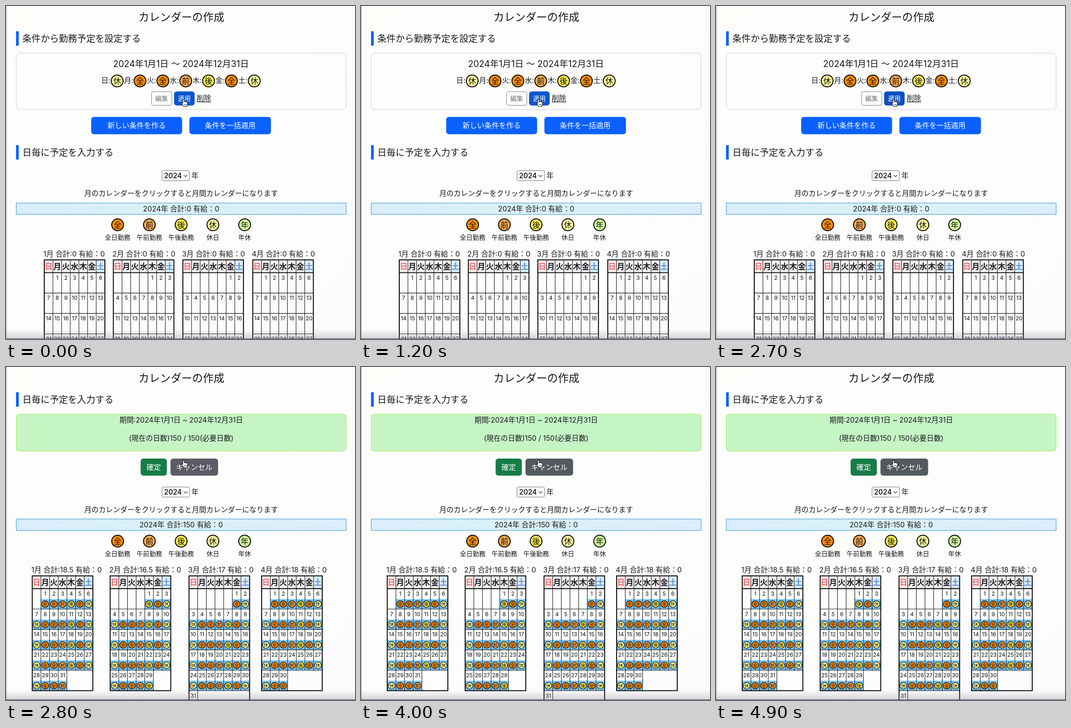
An HTML page for the animation above (5 s loop, 766 by 731 pixels).

```html
<!DOCTYPE html>
<html lang="ja">
<head>
<meta charset="utf-8">
<title>カレンダーの作成</title>
<style>
html, body { margin: 0; width: 100%; height: 100%; overflow: hidden; background: #fdfdfd; }
svg { display: block; width: 766px; height: 731px; }
text { font-family: Inter, "Noto Sans CJK JP", "Noto Sans CJK", sans-serif; fill: #17191c; white-space: pre; }
</style>
</head>
<body>
<svg id="stage" viewBox="0 0 766 731" xmlns="http://www.w3.org/2000/svg"></svg>
<script>
const LOOP = 5000, APPLY_AT = 2800;
const WEEK = [...'日月火水木金土'];
const PLAN = [...'休全全前後全休'];
const COLOR = { 全: '#ff8c00', 前: '#fba94a', 後: '#fdec52', 休: '#ffff9c', 年: '#d0fb9e' };
const LEGEND = [['全', '全日勤務'], ['前', '午前勤務'], ['後', '午後勤務'], ['休', '休日'], ['年', '年休']];
// first weekday, number of days, working days
const MONTHS = [[1, 31, 18.5], [4, 29, 16.5], [5, 31, 17], [1, 30, 18]];
const COL = 19, ROW = 44.8;

const text = (x, y, size, str, more = '') =>
  `<text x="${x}" y="${y}" font-size="${size}" ${more}>${str}</text>`;
const mid = (x, y, size, str, more = '') => text(x, y, size, str, 'text-anchor="middle" ' + more);
const rect = (x, y, w, h, fill, more = '') =>
  `<rect x="${x}" y="${y}" width="${w}" height="${h}" fill="${fill}" ${more}/>`;
const path = (d, more) => `<path d="${d}" ${more}/>`;

function badge(x, y, kind, r, size, line) {
  return `<circle cx="${x}" cy="${y}" r="${r}" fill="${COLOR[kind]}" stroke="#000" stroke-width="${line}"/>` +
    mid(x, y + size * 0.37, size, kind, 'font-weight="500" style="fill:#111"');
}

function heading(y, str) {
  return rect(22, y - 0.5, 6, 31.5, '#0d62fb') + text(36, y + 22.5, 20, str);
}

function button(x, y, w, h, fill, str, size, more = '') {
  return rect(x, y, w, h, fill, 'rx="6" ' + more) +
    mid(x + w / 2, y + h / 2 + size * 0.37, size, str, 'style="fill:#fff"');
}

function monthTable(x, y, [start, days], filled) {
  const rows = Math.ceil((start + days) / 7), width = COL * 7;
  const top = y + 28, bottom = top + ROW * rows;
  const lastCols = (start + days - 1) % 7 + 1;
  let out = '', lines = '';
  WEEK.forEach((d, i) => {
    const fill = i === 0 ? '#fdecec' : i === 6 ? '#d9edfc' : '#f3f1f3';
    const ink = i === 0 ? '#f06a70' : i === 6 ? '#5b8fdc' : '#1c1c20';
    out += rect(x + i * COL, y, COL, 28, fill) +
      mid(x + (i + 0.5) * COL, y + 20.3, 17, d, `font-weight="700" style="fill:${ink}"`);
  });
  for (let n = 1; n <= days; n++) {
    const cell = start + n - 1, c = cell % 7;
    const cx = x + (c + 0.5) * COL, cy = top + Math.floor(cell / 7) * ROW;
    if (filled) {
      out += rect(cx - COL / 2, cy + 23, COL, ROW - 23, '#7cc5f9') + badge(cx, cy + 34, PLAN[c], 7.4, 10.5, 1.2);
    }
    out += mid(cx, cy + 15.2, 12, n, 'style="fill:#0c0d0f"');
  }
  for (let r = 1; r < rows; r++) lines += `M${x} ${top + r * ROW}h${width}`;
  for (let c = 1; c < 7; c++) {
    const end = c <= lastCols ? bottom : bottom - ROW;
    lines += `M${x + c * COL} ${y}V${end}`;
  }
  return out + path(lines, 'stroke="#111" stroke-width="1.1" fill="none"') +
    path(`M${x} ${top}h${width}`, 'stroke="#000" stroke-width="1.8"') +
    rect(x, y, width, bottom - y, 'none', 'stroke="#000" stroke-width="2"');
}

// year picker, yearly summary, legend and month tables
function yearView(y, lefts, filled) {
  const total = filled ? 150 : 0, low = filled ? y - 0.8 : y;
  let out = rect(342.5, y + 0.5, 60, 22, '#fff', 'rx="2.5" stroke="#6f6f74"') +
    text(347, y + 17.3, 15.4, '2024', 'font-weight="500" style="fill:#000"') +
    path(`M390 ${y + 10}l4 4 4-4`, 'fill="none" stroke="#333" stroke-width="1.1"') +
    text(407, y + 17.3, 15.8, '年') +
    mid(384.5, y + 56, 15.75, '月のカレンダーをクリックすると月間カレンダーになります') +
    rect(22.5, low + 71.5, 724, 25, 'url(#bar)', 'stroke="#2b93d4"') +
    mid(384.5, low + 90, 15.8, `2024年 合計:${total} 有給：0`);
  LEGEND.forEach(([kind, label], i) => {
    const x = 245 + i * 69.7;
    out += badge(x, y + 119.3, kind, 13, 17, 2) + mid(x, y + 151.6, 14, label);
  });
  MONTHS.forEach((m, i) => {
    const sum = filled ? m[2] : 0;
    out += text(lefts[i] - 2, low + 188.8, 15.85, `${i + 1}月 合計:${sum} 有給：0`) +
      monthTable(lefts[i], low + 196.3, m, filled);
  });
  return out;
}

function conditionPage() {
  let out = heading(56, '条件から勤務予定を設定する') +
    rect(22.5, 103.5, 724, 123.5, 'none', 'rx="7" stroke="#cbcbcd"') +
    mid(384, 134, 19.4, '2024年1月1日 ～ 2024年12月31日');
  WEEK.forEach((d, i) => {
    const x = 244 + i * 50.15;
    out += text(x - 35, 169, 15.75, d + ':') + badge(x, 164.5, PLAN[i], 13, 17, 2);
  });
  return out +
    rect(319.5, 188, 44.5, 30, '#fdfdfe', 'rx="4" stroke="#75797e"') +
    mid(341.5, 208, 14, '編集', 'style="fill:#75797e"') +
    button(369, 187.5, 45, 31, '#0b56cd', '適用', 14, 'id="apply"') +
    text(418.7, 207.7, 15.8, '削除') + rect(419, 210, 31.5, 1.2, '#17191c') +
    button(187, 243.5, 199.5, 38, '#0a61ff', '新しい条件を作る', 16) +
    button(402.5, 243.5, 179, 38, '#0a61ff', '条件を一括適用', 15.9) +
    heading(306, '日毎に予定を入力する') +
    yearView(361, [84, 235.6, 388.2, 541.6], false);
}

function resultPage() {
  return heading(56, '日毎に予定を入力する') +
    rect(22.5, 103.5, 724, 81, 'url(#ok)', 'rx="6" stroke="#9bee4c"') +
    mid(384.5, 122, 15.65, '期間:2024年1月1日 ~ 2024年12月31日') +
    mid(384.5, 162, 15.7, '(現在の日数)150 / 150(必要日数)') +
    button(295.5, 201, 57.5, 37.5, '#167c46', '確定', 16) +
    button(361, 201, 104.5, 37.5, '#555a5f', 'キャンセル', 16, 'id="cancel"') +
    yearView(263, [57.6, 228.6, 401.7, 561.1], true);
}

function hand() {
  return path('M388 213.8V206.2a1.6 1.6 0 0 1 3.2 0v4.2c.3-1 2.4-1 2.7.2c.5-.9 2.3-.7 2.5.5c.6-.7 2-.3 2 .9v3.6c0 2-1.2 2.6-1.3 5.2h-7.4c-.2-1.8-2.6-3.6-4-6.6c-.6-1.4 1-2.3 2.3-.2z',
    'fill="#fff" stroke="#111" stroke-width="1.1" stroke-linejoin="round"') +
    path('M391.2 214.8v3.4M393.4 214.8v3.4M395.6 214.8v3.4', 'stroke="#111" stroke-width=".8"');
}

function gradient(id, attrs, ...stops) {
  const list = stops.map(([at, color, alpha = 1]) =>
    `<stop offset="${at}" stop-color="${color}" stop-opacity="${alpha}"/>`).join('');
  return `<linearGradient id="${id}" ${attrs}>${list}</linearGradient>`;
}

const stage = document.getElementById('stage');
stage.innerHTML = '<defs>' +
  gradient('page', 'x2="1" y2="1"', [0, '#fdfdfa'], [0.4, '#fdfdfc'], [1, '#fcfcfe']) +
  gradient('bar', 'x2="1"', [0, '#d9edfb'], [0.45, '#d9f1f6'], [1, '#dceefc']) +
  gradient('ok', 'x2="1"', [0, '#c6f5c4'], [1, '#c5f4c6']) +
  gradient('fade', 'x2="0" y2="1"', [0, '#77777a', 0], [1, '#77777a', 0.3]) +
  '</defs>' + rect(0, 0, 766, 731, 'url(#page)') +
  mid(385, 32.5, 23.6, 'カレンダーの作成') +
  `<g id="before">${conditionPage()}</g><g id="after">${resultPage()}</g>` + hand() +
  rect(0, 0, 2, 731, '#c9c9cd') + rect(0, 709, 766, 21, 'url(#fade)') + rect(0, 730, 766, 1, '#1d3a66');

const byId = id => document.getElementById(id);
const before = byId('before'), after = byId('after'), apply = byId('apply'), cancel = byId('cancel');

function draw(t) {
  const applied = t >= APPLY_AT;
  before.style.display = applied ? 'none' : '';
  after.style.display = applied ? '' : 'none';
  apply.setAttribute('fill', t >= 2600 ? '#0d50c2' : '#0b56cd');
  cancel.setAttribute('fill', t < 3100 ? '#5b5c66' : '#54595d');
}

const origin = performance.now();
function tick() {
  draw((performance.now() - origin) % LOOP);
  requestAnimationFrame(tick);
}
tick();
</script>
</body>
</html>
```
